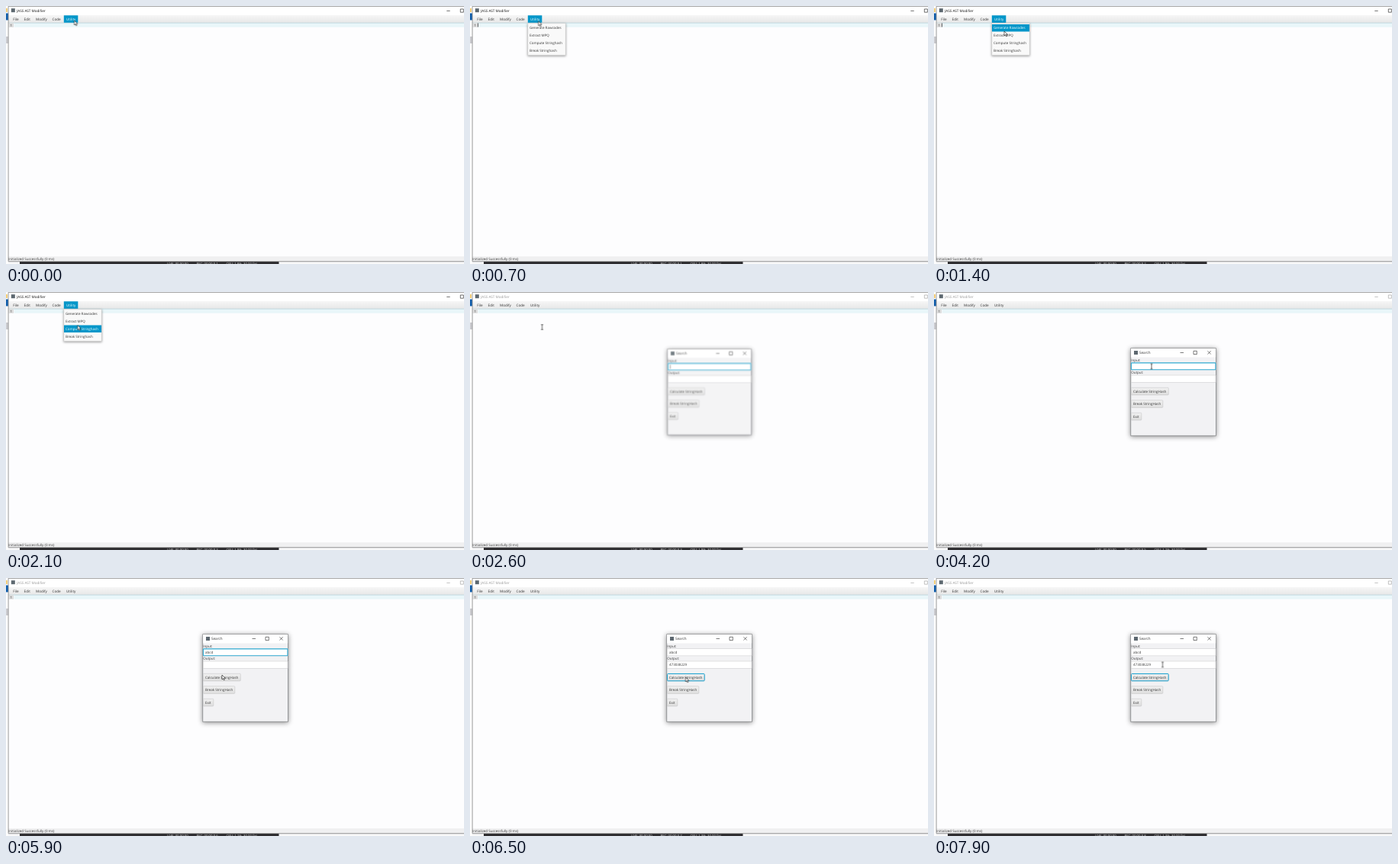
Write an HTML page that moves like this. It is 600x338 px and loops after 8 s.

```html
<!DOCTYPE html>
<html lang="en">
<head>
<meta charset="utf-8">
<title>JASS AST Modifier</title>
<style>
html, body { margin: 0; width: 100%; height: 100%; overflow: hidden; background: #fcfcfc; }
svg { display: block; width: 100%; height: 100%; }
text { font: 4.5px "Open Sans", "Noto Sans", sans-serif; fill: inherit; text-rendering: geometricPrecision; white-space: pre; }
.title { font-size: 4.62px; }
.menu { font-size: 4.6px; }
.stats { font-size: 4.3px; fill: #ddd; }
.line { fill: none; stroke: currentColor; stroke-width: .6; }

/* One 8 s clock; stepped parts change hard, moving parts ease. */
.step, .move { animation: 8s infinite; }
.step { animation-timing-function: step-end; }
.move { animation-timing-function: ease-in-out; }

.head { animation-name: dim; }
@keyframes dim { 0% { color: #111; } 31.25%, 100% { color: #999; } }

.utility { animation-name: utility; }
@keyframes utility { 0% { opacity: 1; } 31.25%, 100% { opacity: 0; } }

.caret { animation-name: caret; }
@keyframes caret {
  0% { opacity: 0; } 5% { opacity: 1; } 11.25% { opacity: 0; }
  17.5% { opacity: 1; } 23.75%, 100% { opacity: 0; }
}

.popup { animation-name: popup; filter: drop-shadow(0 1px 1.5px #0006); }
@keyframes popup { 0% { opacity: 0; } 6.25% { opacity: 1; } 31.25%, 100% { opacity: 0; } }
.pick1 { animation-name: pick1; }
.pick2 { animation-name: pick2; }
.pick3 { animation-name: pick3; }
@keyframes pick1 { 0% { opacity: 0; } 11.25% { opacity: 1; } 18.75%, 100% { opacity: 0; } }
@keyframes pick2 { 0% { opacity: 0; } 18.75% { opacity: 1; } 25%, 100% { opacity: 0; } }
@keyframes pick3 { 0% { opacity: 0; } 25%, 100% { opacity: 1; } }

.dialog { animation-name: open; transform-origin: 313.5px 131px; filter: drop-shadow(0 1.5px 3px #0007); }
@keyframes open {
  0%, 31.24% { opacity: 0; transform: scale(.9); }
  31.25% { opacity: .3; transform: scale(.92); }
  32.5% { opacity: .85; transform: scale(.982); }
  33.75%, 100% { opacity: 1; transform: none; }
}

.key1 { animation-name: key1; }
.key2 { animation-name: key2; }
.key3 { animation-name: key3; }
.key4 { animation-name: key4; }
@keyframes key1 { 0% { fill-opacity: 0; } 56.25%, 100% { fill-opacity: 1; } }
@keyframes key2 { 0% { fill-opacity: 0; } 58.75%, 100% { fill-opacity: 1; } }
@keyframes key3 { 0% { fill-opacity: 0; } 60.625%, 100% { fill-opacity: 1; } }
@keyframes key4 { 0% { fill-opacity: 0; } 62.5%, 100% { fill-opacity: 1; } }

.field-caret { animation-name: field-caret; }
@keyframes field-caret {
  0% { opacity: 1; } 37.5% { opacity: 0; } 43.75% { opacity: 1; } 50% { opacity: 0; }
  56.25% { opacity: 1; transform: translateX(2.5px); }
  58.75% { opacity: 1; transform: translateX(5.3px); }
  60.625% { opacity: 1; transform: translateX(7.4px); }
  62.5% { opacity: 1; transform: translateX(10.2px); }
  68.75% { opacity: 0; transform: translateX(10.2px); }
  75% { opacity: 1; transform: translateX(10.2px); }
  78.75%, 100% { opacity: 0; transform: translateX(10.2px); }
}

.before { animation-name: before; }
.after { animation-name: after; }
@keyframes before { 0% { opacity: 1; } 78.75%, 100% { opacity: 0; } }
@keyframes after { 0% { opacity: 0; } 78.75%, 100% { opacity: 1; } }

.seconds { animation: roll 8s steps(8) infinite; }
@keyframes roll { to { transform: translateY(-80px); } }
.load { animation-name: load; }
@keyframes load {
  0% { transform: none; } 12.5% { transform: translateY(-10px); }
  52.5% { transform: translateY(-20px); } 75%, 100% { transform: translateY(-30px); }
}

.pointer { animation-name: pointer; }
@keyframes pointer {
  0%, 7.5% { transform: translate(89.5px, 19px); }
  15%, 17.5% { transform: translate(92px, 33px); }
  21.25%, 23.75% { transform: translate(93px, 41px); }
  28.75%, 33.75% { transform: translate(94.5px, 46px); }
  42.5%, 63.75% { transform: translate(285px, 97.5px); }
  73.75% { transform: translate(283px, 127px); }
  78.75%, 86.25% { transform: translate(282.5px, 130px); }
  93.75%, 98.74% { transform: translate(299.5px, 112px); }
  98.75%, 100% { transform: translate(299.5px, 113.5px); }
}
.arrow { animation-name: arrow; }
.beam { animation-name: beam; }
@keyframes arrow { 0% { opacity: 1; } 31.25% { opacity: 0; } 66.875% { opacity: 1; } 90.625%, 100% { opacity: 0; } }
@keyframes beam { 0% { opacity: 0; } 31.25% { opacity: 1; } 66.875% { opacity: 0; } 90.625%, 100% { opacity: 1; } }
</style>
</head>
<body>
<svg viewBox="0 0 600 338" fill="#333">
  <defs>
    <linearGradient id="bar" x2="0" y2="1">
      <stop stop-color="#f6f6f6"/><stop offset="1" stop-color="#e7e7e7"/>
    </linearGradient>
    <linearGradient id="button" x2="0" y2="1">
      <stop stop-color="#f1f1f1"/><stop offset="1" stop-color="#dedede"/>
    </linearGradient>
  </defs>

  <!-- Desktop behind the window -->
  <path fill="#fcfcfc" d="M0 0h600v338H0z"/>
  <path fill="#f3cf7c" d="M0 3h2v5H0z"/>
  <path fill="#1460ad" d="M0 9.5h3v9H0z"/>
  <path fill="#cbcbcf" d="M0 40h3v9H0z"/>
  <path fill="#ececee" d="M3 335h597v1.5H3z"/>
  <path fill="#2e2d30" d="M18 335h339.500v3H18z"/>
  <svg x="200" y="335" width="150" height="3" viewBox="200 335 150 3">
    <g class="stats">
      <text class="stats" x="211" y="338.700">LIVE: 00:00:00</text>
      <text class="stats" x="249.500" y="338.700">REC: 00:00:0</text>
      <text class="stats seconds"><tspan x="275.300" y="338.700">1</tspan><tspan x="275.300" y="348.700">2</tspan><tspan x="275.300" y="358.700">3</tspan><tspan x="275.300" y="368.700">4</tspan><tspan x="275.300" y="378.700">5</tspan><tspan x="275.300" y="388.700">6</tspan><tspan x="275.300" y="398.700">7</tspan><tspan x="275.300" y="408.700">8</tspan></text>
      <text class="stats step load"><tspan x="288.500" y="338.700">CPU: 1.8%, 30.00 fps</tspan><tspan x="288.500" y="348.700">CPU: 1.9%, 30.00 fps</tspan><tspan x="288.500" y="358.700">CPU: 1.2%, 30.00 fps</tspan><tspan x="288.500" y="368.700">CPU: 1.3%, 30.00 fps</tspan></text>
    </g>
  </svg>

  <!-- Main window -->
  <path fill="#fdfdfe" d="M3 0h597v334.500H3z"/>
  <path fill="#fff" d="M3 0h597v12H3z"/>
  <path fill="url(#bar)" d="M3 12h597v10H3z"/>
  <path fill="#e9f6f9" d="M10.500 22h589.500v5.800H10.500z"/>
  <path fill="#b5d0d8" d="M3 21.800h597v.6H3z"/>
  <path fill="#dcdcdc" d="M3.500 22.400h6.500v5.400H3.500z"/>
  <text x="5.500" y="26.700" fill="#666">1</text>
  <path class="step caret" fill="#222" d="M10.200 22.500h.7v5h-.7z"/>
  <path fill="#f0f0f1" d="M3 328h597v6.500H3z"/>
  <text x="3" y="333">Initialized Successfully (0 ms)</text>
  <path fill="none" stroke="#858585" stroke-width=".8" d="M600 .4H3.100V334.600H600"/>

  <path fill="#5d6870" d="M6.800 3.200h5v5h-5z"/>
  <g class="step head" fill="currentColor">
    <text class="title" x="14" y="7.900">JASS AST Modifier</text>
    <path class="line" d="M577.300 6.400h4.400M595.300 4h4v4.200h-4z"/>
  </g>
  <text class="menu" x="9.300" y="18.700">File</text>
  <text class="menu" x="23.600" y="18.700">Edit</text>
  <text class="menu" x="39" y="18.700">Modify</text>
  <text class="menu" x="60.600" y="18.700">Code</text>
  <text class="menu" x="79" y="18.700">Utility</text>
  <g class="step utility" fill="#fff">
    <path fill="#0096c9" d="M75.800 12.300h18.500v9.500H75.800z"/>
    <text class="menu" x="79" y="18.700">Utility</text>
  </g>

  <!-- Utility menu -->
  <g class="step popup">
    <path fill="#f9f9f9" stroke="#c4c4c4" stroke-width=".5" d="M75.700 22.600h49.600v41.800H75.700z"/>
    <text id="item1" x="78" y="30.200">Generate Rawcodes</text>
    <text id="item2" x="78" y="40">Extract MPQ</text>
    <text id="item3" x="78" y="49.800">Compute Stringhash</text>
    <text x="78" y="59.600">Break Stringhash</text>
    <g fill="#fff">
      <g class="step pick1"><path fill="#0096c9" d="M76 23.900h49v9.600H76z"/><use href="#item1"/></g>
      <g class="step pick2"><path fill="#0096c9" d="M76 33.700h49v9.600H76z"/><use href="#item2"/></g>
      <g class="step pick3"><path fill="#0096c9" d="M76 43.500h49v9.600H76z"/><use href="#item3"/></g>
    </g>
  </g>

  <!-- Search dialog -->
  <g class="move dialog">
    <path fill="#f2f2f4" stroke="#77797c" stroke-width=".7" d="M257.700 73.700h111.800v114.600H257.700z"/>
    <path fill="#fff" d="M258.100 74.100h111v11.300h-111z"/>
    <path fill="#5d6870" d="M262 77h5v5h-5z"/>
    <text class="title" x="269" y="81.300">Search</text>
    <path class="line" color="#222" d="M322.500 79.500h4.500M340 77.300h4.300v4.300h-4.300zM358.500 77.300l4.200 4.200m0-4.200l-4.200 4.200"/>
    <text x="258.200" y="91">Input:</text>
    <text x="258.200" y="107.300">Output:</text>
    <g fill="#fff" stroke="#c6c6c8" stroke-width=".5">
      <rect x="258.200" y="92.700" width="110.900" height="9.200"/>
      <rect x="258.200" y="109" width="110.900" height="9.500"/>
    </g>
    <rect class="step before" x="258.500" y="92.900" width="110.400" height="8.900" rx=".5" fill="none" stroke="#35aed6" stroke-width="1.100"/>
    <text x="261" y="99"><tspan class="step key1">a</tspan><tspan class="step key2">b</tspan><tspan class="step key3">c</tspan><tspan class="step key4">d</tspan></text>
    <path class="step field-caret" fill="#333" d="M261.300 94.700h.5v5.200h-.5z"/>
    <text class="step after" x="261" y="115.400">473038229</text>
    <g fill="url(#button)" stroke="#bcbcbe" stroke-width=".5">
      <rect x="258.300" y="125.300" width="49" height="9.600" rx="1"/>
      <rect x="258.300" y="141.800" width="41.500" height="9.600" rx="1"/>
      <rect x="258.300" y="158.300" width="13.500" height="9.600" rx="1"/>
    </g>
    <rect class="step after" x="258.500" y="125.500" width="48.700" height="9.300" rx="1" fill="none" stroke="#1ba4d3" stroke-width="1"/>
    <text x="261" y="131.900">Calculate StringHash</text>
    <text x="261" y="148.400">Break StringHash</text>
    <text x="261" y="164.900">Exit</text>
  </g>

  <!-- Mouse pointer -->
  <g class="move pointer">
    <path class="step arrow" fill="#fff" stroke="#111" stroke-width=".6" stroke-linejoin="round" d="M0 0v6l1.400-1.300 1 2.200 1-.5-1-2.100h1.900z"/>
    <path class="step beam" fill="none" stroke="#222" stroke-width=".7" d="M-1.400-3.200h2.800M0-3.200v6.400M-1.400 3.200h2.800"/>
  </g>
</svg>
</body>
</html>
```
